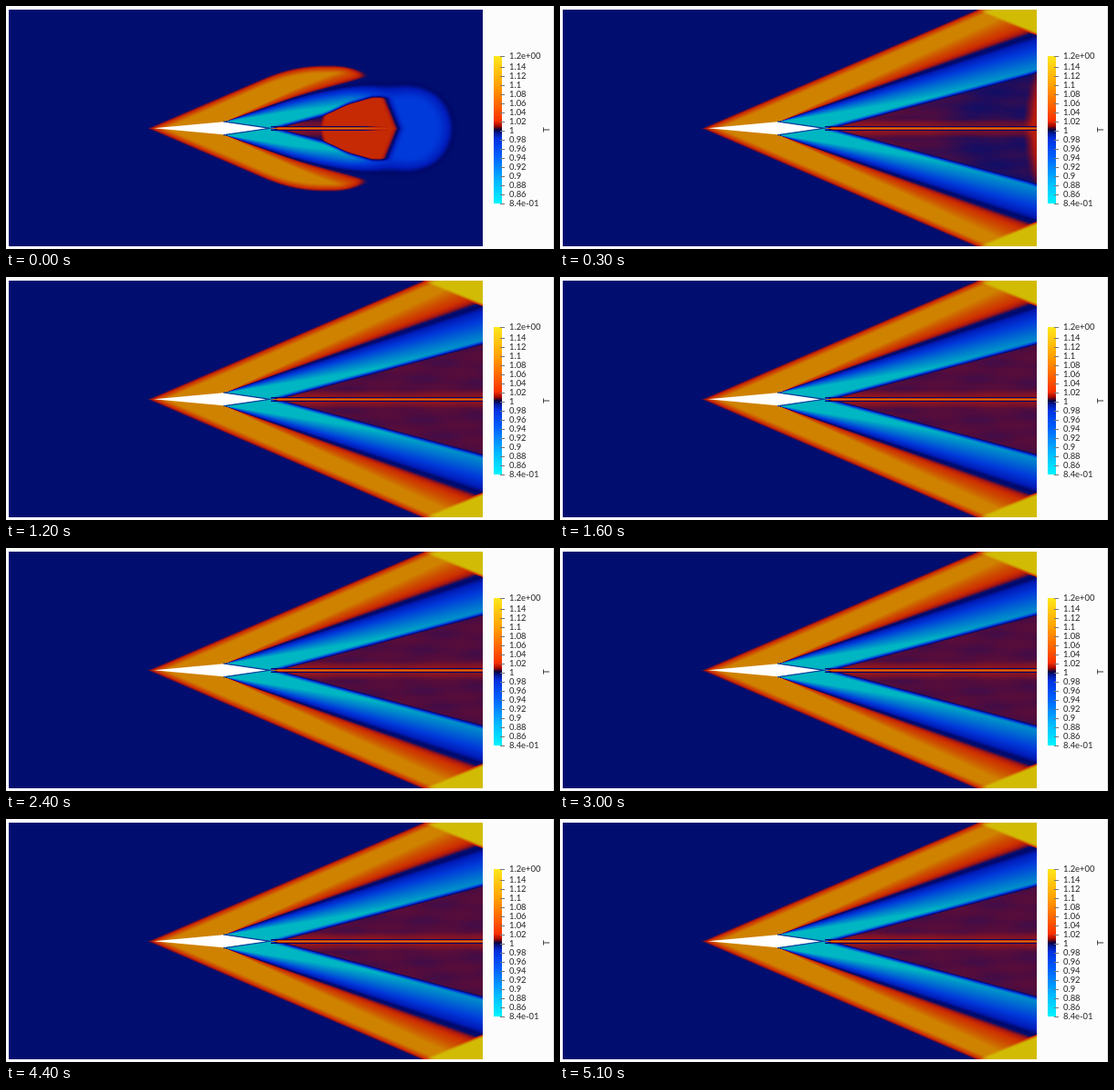
Animation, 600 px wide and 267 px high, one loop 5200 ms. Source, as an HTML page with a canvas:

```html
<!DOCTYPE html>
<html lang="en">
<head>
<meta charset="utf-8">
<title>Supersonic flow over a diamond wedge</title>
<style>
html, body { margin: 0; width: 600px; height: 267px; overflow: hidden; background: #fcfcfc }
canvas { display: block }
</style>
</head>
<body>
<canvas id="stage" width="600" height="267"></canvas>
<script>
const ctx = document.getElementById('stage').getContext('2d');
const LEFT = 3, TOP = 4, W = 519, H = 260, AXIS = 134;
const NOSE = 162, SHOULDER = 238, TAIL = 289;
const LOOP = 5200, STEP = 100;
const image = ctx.createImageData(W, H);

// temperature, red, green, blue
const ramp = [
  [.84, 0, 215, 215], [.875, 0, 182, 194], [.92, 0, 115, 208], [.955, 0, 58, 218],
  [.98, 0, 28, 185], [.992, 0, 8, 105], [1, 0, 14, 112], [1.005, 80, 12, 62],
  [1.015, 175, 25, 15], [1.03, 205, 48, 0], [1.06, 205, 80, 0], [1.1, 207, 130, 0], [1.16, 210, 192, 4]
];

const clamp = x => Math.max(0, Math.min(1, x));
const mix = (a, b, f) => a + (b - a) * f;
const smooth = (a, b, x) => { const f = clamp((x - a) / (b - a)); return f * f * (3 - 2 * f); };
const softMin = (a, b, k) => Math.min(a, b) - Math.max(k - Math.abs(a - b), 0) ** 2 / (4 * k);

function rampColor(t) {
  let i = 1;
  while (i < ramp.length - 1 && t > ramp[i][0]) i++;
  const a = ramp[i - 1], b = ramp[i], f = clamp((t - a[0]) / (b[0] - a[0]));
  return [1, 2, 3].map(c => mix(a[c], b[c], f));
}
const palette = Array.from({ length: 1001 }, (_, i) => rampColor(.83 + i * .00035));

// Each wave grows self-similarly, by the scale s, from the corner that sheds it.
function temperature(x, h, s) {
  const u = (x - NOSE) / s, su = (x - SHOULDER) / s, wu = (x - TAIL) / s, v = h / s;

  const crest = 66 - .006 * Math.max(0, u - 195) ** 2;
  const front = s * softMin(.433 * u, crest, 14) - h;
  const shock = smooth(-4, 6.5, front) * smooth(243, 222, u);

  let fan = .1;
  if (x > SHOULDER) {
    const slope = (h - 7) / (x - SHOULDER) + .035 * smooth(60, 150, su) - .35;
    fan = slope > 0 ? .1 * clamp(slope / .12) : -.125 * clamp(-slope / .19);
  }
  let dT;
  if (fan > 0) dT = fan * shock;
  else {
    const reach = Math.hypot(Math.max(0, su - 195) / 62, v / 57);
    dT = fan * mix(1, .36, smooth(130, 185, su)) * smooth(1.04, .58, reach);
  }

  if (x > 445) {
    const reflected = smooth(-2, 3, h - 129 + .41 * (x - 459));
    dT = mix(dT, .155, reflected * shock * smooth(1.5, 3, s));
  }

  if (x > TAIL && wu < 160) {
    const edge = s * Math.min(.27 * wu + 5 * smooth(55, 90, wu), 35) - h;
    const inside = smooth(-3, 3, edge) * smooth(150, 132, wu + .4 * v);
    const blotch = .0008 * Math.sin(x * .06 + h * .11) * Math.sin(h * .22 - x * .035);
    let wake = mix(.005, .002, smooth(20, 45, wu)) + blotch + .006 * smooth(12, 3, h);
    wake = mix(wake, .026, smooth(54, 60, wu - .012 * v * v));
    dT = mix(dT, wake, inside);
    const jet = smooth(135, 90, wu);
    if (h < 1) dT = mix(dT, .09, jet);
    else if (h < 2) dT = mix(dT, .03, jet * smooth(0, 12, x - TAIL));
    else if (h < 3) dT = mix(dT, -.008, jet);
  }
  return 1 + dT;
}

function drawField(s) {
  for (let h = 0; h <= AXIS - TOP; h++) {
    for (let i = 0; i < W; i++) {
      const t = temperature(i + LEFT, h, s);
      const [r, g, b] = palette[Math.round(clamp((t - .83) / .35) * 1000)];
      for (const row of [AXIS - TOP - h, AXIS - TOP + h]) {
        if (row >= H) continue;
        const p = (row * W + i) * 4;
        image.data[p] = r;
        image.data[p + 1] = g;
        image.data[p + 2] = b;
        image.data[p + 3] = 255;
      }
    }
  }
  ctx.putImageData(image, LEFT, TOP);
}

function drawWedge() {
  const mid = AXIS + .3;
  ctx.fillStyle = '#fff';
  ctx.beginPath();
  ctx.moveTo(NOSE, mid);
  ctx.lineTo(SHOULDER, mid - 7);
  ctx.lineTo(TAIL, mid);
  ctx.lineTo(SHOULDER, mid + 7);
  ctx.fill();
  ctx.strokeStyle = '#0b3f9c';
  ctx.lineWidth = 1.2;
  ctx.beginPath();
  ctx.moveTo(SHOULDER, mid - 7.5);
  ctx.lineTo(TAIL, mid);
  ctx.lineTo(SHOULDER, mid + 7.5);
  ctx.stroke();
}

function drawLegend() {
  const bar = ctx.createLinearGradient(0, 55, 0, 217);
  [[0, '#ffe71c'], [.2, '#ffa000'], [.33, '#ff6500'], [.44, '#f83000'], [.475, '#a00800'],
   [.5, '#080040'], [.525, '#001a9a'], [.56, '#0030e0'], [.68, '#0060ff'],
   [.85, '#00b8ff'], [1, '#00f4ff']].forEach(([at, color]) => bar.addColorStop(at, color));
  ctx.fillStyle = bar;
  ctx.fillRect(534, 55, 9, 162);
  ctx.font = '9.4px Lato, sans-serif';
  ctx.textBaseline = 'middle';
  const label = (text, y) => {
    ctx.fillStyle = '#777';
    ctx.fillRect(541, y, 5, 1);
    ctx.fillStyle = '#222';
    ctx.fillText(text, 551, y + .5);
  };
  label('1.2e+00', 55);
  for (let i = 0; i < 15; i++) label(String(+(1.14 - i * .02).toFixed(2)), 67 + i * 10);
  label('8.4e-01', 217);
  ctx.save();
  ctx.translate(592, 136);
  ctx.rotate(-Math.PI / 2);
  ctx.textAlign = 'center';
  ctx.fillText('T', 0, 0);
  ctx.restore();
  ctx.fillStyle = '#dcdcdc';
  ctx.fillRect(599, 0, 1, 267);
}

let shown = -1;
function frame() {
  const step = Math.floor(performance.now() % LOOP / STEP);
  if (step !== shown) {
    drawField(step + 1);
    drawWedge();
    shown = step;
  }
  requestAnimationFrame(frame);
}
drawLegend();
frame();
</script>
</body>
</html>
```
